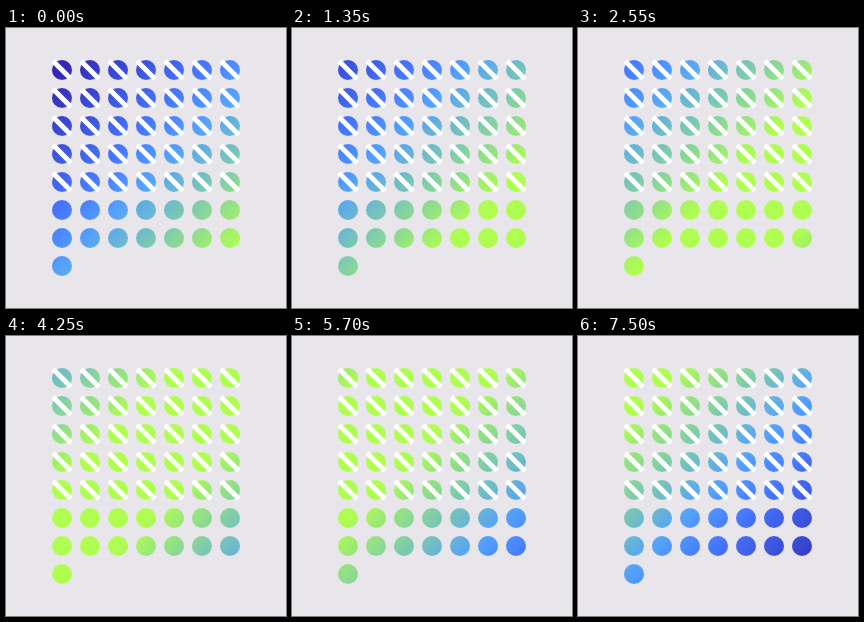
An HTML page without scripts that plays this animation: 280 by 280 pixels, repeating every 7.55 s.

```html
<!DOCTYPE html>
<html lang="en">
<head>
<meta charset="utf-8">
<title>Gradient dots</title>
<style>
  html, body { margin: 0; width: 100%; height: 100%; overflow: hidden; background: #e8e6eb; }
  svg { display: block; width: 100vw; height: 100vh; }
  .dots { fill: none; stroke: #fff; stroke-width: 20; stroke-linecap: round; stroke-dasharray: 0 28; }
  .slashes { fill: none; stroke: #fff; stroke-width: 5; }
  .sheet { animation: drift 7.55s steps(151) infinite; }
  @keyframes drift { to { transform: translateX(-445.45px); } }
</style>
</head>
<body>
<svg viewBox="0 0 280 280">
  <defs>
    <linearGradient id="hues" gradientUnits="userSpaceOnUse" x1="0" y1="0" x2="513" y2="513">
      <stop offset=".0955" stop-color="#3626b4"/>
      <stop offset=".146" stop-color="#3a45d0"/>
      <stop offset=".229" stop-color="#4676fd"/>
      <stop offset=".283" stop-color="#539ffd"/>
      <stop offset=".439" stop-color="#b0fd52"/>
      <stop offset=".561" stop-color="#b0fd52"/>
      <stop offset=".717" stop-color="#539ffd"/>
      <stop offset=".771" stop-color="#4676fd"/>
      <stop offset=".854" stop-color="#3a45d0"/>
      <stop offset=".9045" stop-color="#3626b4"/>
    </linearGradient>
    <!-- zero-length round dashes form the dots -->
    <mask id="grid" maskUnits="userSpaceOnUse" x="0" y="0" width="280" height="280">
      <path class="dots" d="M56 42h169M56 70h169M56 98h169M56 126h169M56 154h169M56 182h169M56 210h169M56 238h1"/>
    </mask>
    <path id="row" d="M47 33l18 18m10-18l18 18m10-18l18 18m10-18l18 18m10-18l18 18m10-18l18 18m10-18l18 18"/>
  </defs>
  <g mask="url(#grid)">
    <rect class="sheet" x="40" y="28" width="660" height="224" fill="url(#hues)"/>
  </g>
  <g class="slashes">
    <use href="#row"/>
    <use href="#row" y="28"/>
    <use href="#row" y="56"/>
    <use href="#row" y="84"/>
    <use href="#row" y="112"/>
  </g>
</svg>
</body>
</html>
```
